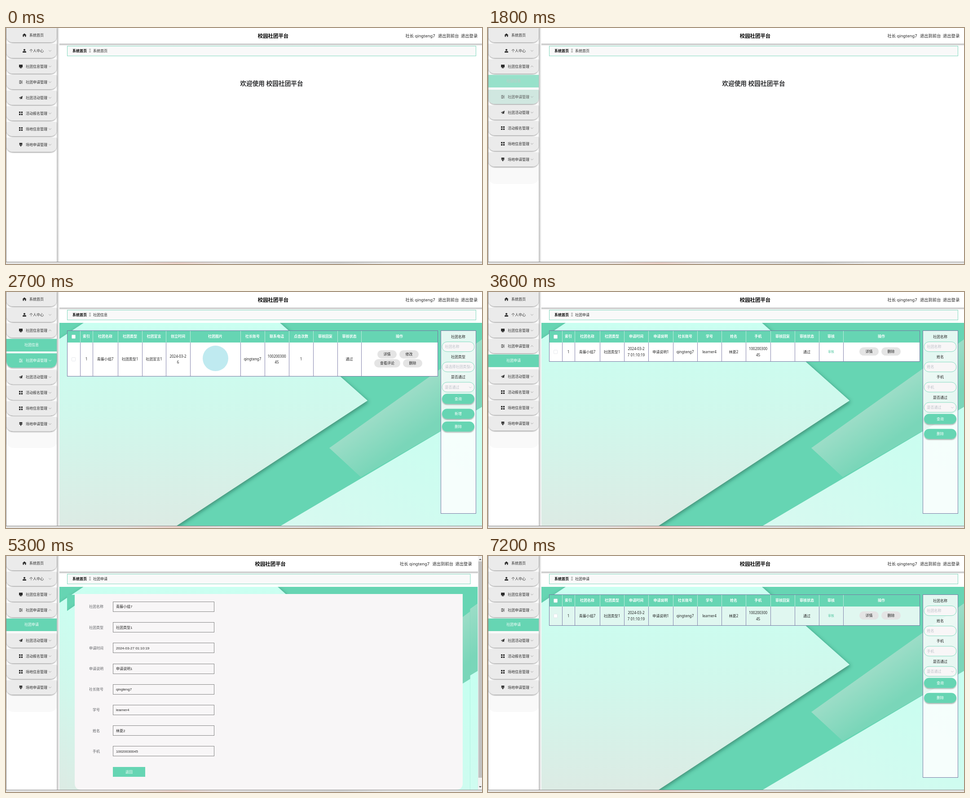
An HTML page for the animation above (8000 ms loop, 1060x528 px).

```html
<!DOCTYPE html>
<html lang="zh">
<head>
<meta charset="utf-8">
<title>校园社团平台</title>
<style>
  html, body { margin: 0; width: 100%; height: 100%; overflow: hidden; background: #fff; }
  svg { display: block; width: 1060px; height: 528px; }
  text { font-family: "Noto Sans", "Noto Sans CJK SC", sans-serif; white-space: pre; }
  .form text { font-family: "Liberation Sans", "Noto Sans CJK SC", sans-serif; }
</style>
</head>
<body>
<svg viewBox="0 0 1060 528">
  <defs>
    <filter id="soft" x="-20%" y="-20%" width="140%" height="160%">
      <feDropShadow dx="0" dy="2" stdDeviation="1.3" flood-color="#000" flood-opacity=".32"/>
    </filter>
    <filter id="deep" x="-10%" y="-10%" width="120%" height="120%">
      <feDropShadow dx="2" dy="3" stdDeviation="4" flood-color="#0a4434" flood-opacity=".5"/>
    </filter>
    <linearGradient id="sheet" x2="0" y2="1">
      <stop stop-color="#cafff1"/><stop offset=".45" stop-color="#d0f8ec"/><stop offset="1" stop-color="#dcebe4"/>
    </linearGradient>
    <linearGradient id="corner" x1="1" x2="0" y2="1">
      <stop stop-color="#c6fff0"/><stop offset="1" stop-color="#d8f9f0"/>
    </linearGradient>
    <linearGradient id="band" gradientUnits="userSpaceOnUse" x1="601" y1="280" x2="655" y2="355">
      <stop stop-color="#9cddc7"/><stop offset="1" stop-color="#7ad6b9"/>
    </linearGradient>
    <linearGradient id="side"><stop stop-color="#bbb"/><stop offset="1" stop-color="#fff"/></linearGradient>
    <linearGradient id="under" x2="0" y2="1"><stop stop-color="#b4b4b4"/><stop offset="1" stop-color="#b4b4b4" stop-opacity="0"/></linearGradient>
    <linearGradient id="strip">
      <stop stop-color="#e4e4e4"/><stop offset=".24" stop-color="#e6e2e0"/><stop offset=".36" stop-color="#ebd2ca"/>
      <stop offset=".46" stop-color="#e4e2e2"/><stop offset=".7" stop-color="#d6d6d6"/><stop offset=".8" stop-color="#e6e6e6"/>
    </linearGradient>
    <clipPath id="art"><rect width="941" height="454"/></clipPath>
    <g id="wall" clip-path="url(#art)">
      <rect width="941" height="454" fill="#66d5b3"/>
      <path d="M601 280L941 37V188L671 345Z" fill="url(#band)"/>
      <path d="M493 454L941 188V454Z" fill="url(#corner)"/>
      <path d="M54 0H491L686 174 261 454H0V36Z" fill="url(#sheet)" filter="url(#deep)"/>
    </g>
  </defs>
  <g id="stage"></g>
</svg>
<script>
const LOOP = 8000, GREEN = '#66d5b3', LINE = '#7777a3';
const USER = 'qingteng7', CLUB = '青藤小组7', LEARNER = 'learner4', PERSON = '林夏2', PHONE = '10020030045';

const rect = (x, y, w, h, fill, extra = '') =>
  `<rect x="${x}" y="${y}" width="${w}" height="${h}" fill="${fill}" ${extra}/>`;
const label = (s, x, y, { size = 8, fill = '#222', anchor = 'middle', bold = false } = {}) =>
  `<text x="${x}" y="${y + size * .37}" font-size="${size}" fill="${fill}" text-anchor="${anchor}"${bold ? ' font-weight="700"' : ''}>${s}</text>`;
const path = (d, stroke, width = 1) => `<path d="${d}" fill="none" stroke="${stroke}" stroke-width="${width}"/>`;
const chevron = (x, y, dir = 1, color = '#888') =>
  path(`M${x - 2.8} ${y - 1.4 * dir}L${x} ${y + 1.4 * dir} ${x + 2.8} ${y - 1.4 * dir}`, color, .7);
const pill = (s, x, y, w, h, fill, color, extra = '') =>
  rect(x - w / 2, y - h / 2, w, h, fill, `rx="${h / 2}" ${extra}`) + label(s, x, y, { fill: color });

function mix(a, b, k) {
  const part = (c, i) => parseInt(c.slice(i, i + 2), 16);
  return `rgb(${[1, 3, 5].map(i => Math.round(part(a, i) + (part(b, i) - part(a, i)) * k))})`;
}

// Linear interpolation through time, value pairs.
function track(points, t) {
  let i = 0;
  while (i < points.length && points[i][0] <= t) i++;
  if (!i) return points[0][1];
  if (i === points.length) return points[i - 1][1];
  const [t0, a] = points[i - 1], [t1, b] = points[i];
  return a + (b - a) * (t - t0) / (t1 - t0);
}

const ICONS = {
  home: '<path d="M-4.5 0L0-4 4.5 0H3.5V3.8H1.2V1H-1.2V3.8H-3.5V0Z"/>',
  user: '<circle cy="-2" r="2.1"/><path d="M-4 4V2.5Q-4 .7-2 .7H2Q4 .7 4 2.5V4Z"/>',
  screen: '<path d="M-4-4H4V2H1V3H2.5V4H-2.5V3H-1V2H-4Z"/>',
  sliders: '<path d="M-4-3.3H4V-2.5H-4ZM-4-.4H4V.4H-4ZM-4 2.5H4V3.3H-4ZM-2-4H-.8V-1.8H-2ZM1-1.1H2.2V1.1H1ZM-2 1.8H-.8V4H-2Z"/>',
  plane: '<path d="M4-4L2.6 3.2 0 2-1.6 4V1.4L2.5-2.5-2.4 1-4.3 0Z"/>',
  grid: '<path d="M-4-4H-.7V-.7H-4ZM.7-4H4V-.7H.7ZM-4 .7H-.7V4H-4ZM.7 .7H4V4H.7Z"/>',
  brush: '<path d="M-3.3-4H3.3V-.8H-3.3ZM-3.3-.2H3.3V1.4H1V4H-1V1.4H-3.3Z"/>'
};

const MENU = [
  { text: '系统首页', icon: 'home' },
  { text: '个人中心', icon: 'user', height: 61,
    hover: [[200, 0], [500, 1], [700, 1], [800, .8], [900, .35], [1000, 0]],
    open: [[500, 0], [600, .2], [700, .8], [800, 1], [1400, 1], [1500, .8], [1600, .2], [1700, 0]],
    subs: [['修改密码', [[700, 0], [900, .58], [1000, 1], [1100, .4], [1200, 0]]],
           ['个人信息', [[1000, 0], [1100, .6], [1200, .6], [1300, 0]]]] },
  { text: '社团信息管理', icon: 'screen', height: 33,
    hover: [[1100, 0], [1300, 1], [1500, 1], [1700, 0]],
    open: [[1400, 0], [1500, .2], [1600, .8], [1700, 1], [2600, 1], [2700, .98], [2800, .6], [2900, .15], [3000, 0]],
    subs: [['社团信息', [[1600, 0], [1800, .67], [1900, 1]]]] },
  { text: '社团申请管理', icon: 'sliders', height: 33,
    hover: [[1500, 0], [1700, .6], [1800, .2], [1900, 0], [2000, 0], [2300, 1], [2900, 1], [3200, 0]],
    open: [[2600, 0], [2700, .06], [2800, .45], [2900, .88], [3000, 1]],
    subs: [['社团申请', [[2900, 0], [3200, 1]]]] },
  { text: '社团活动管理', icon: 'plane', hover: [[3700, 0], [4000, 1], [4400, 1], [4600, 0]] },
  { text: '活动报名管理', icon: 'grid' },
  { text: '场地信息管理', icon: 'grid' },
  { text: '场地申请管理', icon: 'brush' }
];

function sidebar(t) {
  let out = rect(0, 0, 113, 523, '#fff') + rect(113, 0, 6, 523, 'url(#side)');
  if (t >= 1700) out += '<path d="M1 311H113V340Q106 349 96 349H18Q8 349 1 340Z" fill="#f9f9f9"/>';
  let y = 16;
  MENU.forEach((item, i) => {
    const hover = item.hover ? track(item.hover, t) : 0;
    const open = item.open ? track(item.open, t) : 0;
    const ink = mix('#2b2b2b', '#ffffff', hover), short = i < 2;
    out += `<path d="M1 ${y - 16}H113V${y}Q113 ${y + 16} 97 ${y + 16}H17Q1 ${y + 16} 1 ${y}Z" fill="${mix('#ebebeb', GREEN, hover)}" filter="url(#soft)"/>`;
    out += `<g transform="translate(${short ? 41 : 33} ${y})" fill="${ink}">${ICONS[item.icon]}</g>`;
    out += label(item.text, 68, y, { fill: ink });
    if (i) out += chevron(98, y, 1 - 2 * open, mix('#888888', '#ffffff', hover));
    if (open > 0) {
      const h = item.height * open, top = y + 18.5;
      out += `<svg x="1" y="${top}" width="112" height="${h}" overflow="hidden" style="width:112px;height:${h}px">${rect(0, 0, 112, item.height + 2, '#f9f9f9')}`;
      item.subs.forEach(([text, glow], n) => {
        const k = track(glow, t), sy = n * 30.5;
        out += rect(0, sy, 112, 28.5, mix('#f9f9f9', GREEN, k)) + label(text, 56, sy + 14, { fill: mix('#555555', '#ffffff', k) });
      });
      out += '</svg>';
      y += h;
    }
    y += 35;
  });
  return out;
}

function header(crumb, shift) {
  const top = { size: 9.3, anchor: 'start' };
  return rect(119, 35, 941 - shift * .7, 5, 'url(#under)') + rect(119, 0, 941, 35, '#fff') +
    label('校园社团平台', 595 - shift / 2, 18, { size: 11.4, bold: true, fill: '#000' }) +
    label('社长 ' + USER, 889.5 - shift, 18, top) +
    label('退出到前台', 962 - shift, 18, top) + label('退出登录', 1013 - shift, 18, top) +
    rect(136.5, 40.5, 910 - shift, 22, '#f9f9f9', 'stroke="#82d9bf"') +
    label('系统首页', 148, 51.5, { anchor: 'start', bold: true, fill: '#000' }) +
    label('Ξ', 187, 51.5) + label(crumb, 194, 51.5, { anchor: 'start' });
}

const wall = (x, y, scale) => `<use href="#wall" transform="translate(${x} ${y}) scale(${scale} 1)"/>`;
const box = (x, y) => rect(x - 4, y - 4, 8, 8, '#fff', 'rx="1" stroke="#dcdfe6" stroke-width=".7"');

function table({ edges, heads, cells, bottom, buttons }, { empty, hover }) {
  const end = empty ? 155 : bottom, mid = (113 + end) / 2;
  const center = i => (edges[i] + edges[i + 1]) / 2;
  let out = rect(136, 86, 825, 27, GREEN) + rect(136, 113, 825, end - 113, hover ? '#e0f7f0' : '#fff');
  out += box(150.5, 100);
  heads.forEach((s, i) => out += label(s, center(i + 1), 99.5, { fill: '#fff', bold: true }));
  edges.slice(1, -1).forEach(x => {
    out += path(`M${x + .5} 86V113`, '#d5f2e8', .8);
    if (!empty) out += path(`M${x + .5} 113V${end}`, LINE, .9);
  });
  if (empty) out += label('暂无数据', 548.5, mid, { fill: '#909399' });
  else {
    out += box(150.5, mid);
    cells.forEach((cell, i) => {
      const lines = cell.split('|');
      lines.forEach((s, n) => out += label(s, center(i + 1), mid + (n - (lines.length - 1) / 2) * 13.3,
        s === '审核' ? { size: 6.7, fill: '#4cc59d' } : {}));
    });
    buttons.forEach(([s, x, y, w = 43]) => out += pill(s, x, y, w, 18.5, '#e4e4e4', '#222'));
  }
  return out + rect(136.5, 86.5, 825, end - 86, 'none', `stroke="${LINE}"`);
}

function panel(fields, buttons) {
  let out = rect(968.5, 86.5, 78, 409, '#fff', `fill-opacity=".82" stroke="${LINE}"`);
  fields.forEach(([name, hint, select], i) => {
    const y = 100 + i * 45.2;
    out += label(name, 1007, y) + rect(971, y + 11.5, 72, 22, '#f8f6f7', 'rx="11" stroke="#66d5b3" stroke-width=".8"') +
      label(hint, 977.5, y + 22.3, { fill: '#bcc0c8', anchor: 'start' });
    if (select) out += chevron(1034, y + 23, 1, '#b5b9c0');
  });
  buttons.forEach(([s, y]) => out += pill(s, 1007, y, 72, 22.5, GREEN, '#fff', 'filter="url(#soft)"'));
  return out;
}

const CLUBS = {
  edges: [136, 165, 193, 249, 303, 356, 410, 522, 576, 630, 684, 738, 791, 961], bottom: 188,
  heads: ['索引', '社团名称', '社团类型', '社团宣言', '创立时间', '社团图片', '社长账号', '联系电话', '点击次数', '审核回复', '审核状态', '操作'],
  cells: ['1', CLUB, '社团类型1', '社团宣言1', '2024-03-2|6', '', USER, PHONE.slice(0, 9) + '|' + PHONE.slice(9), '1', '', '通过'],
  buttons: [['详情', 848.5, 139.5], ['修改', 897.5, 139.5], ['查看评论', 849, 159.5, 58], ['删除', 905.5, 159.5]]
};
const REQUESTS = {
  edges: [136, 165, 193, 249, 303, 357, 412, 466, 520, 574, 629, 683, 737, 791, 961], bottom: 155,
  heads: ['索引', '社团名称', '社团类型', '申请时间', '申请说明', '社长账号', '学号', '姓名', '手机', '审核回复', '审核状态', '审核', '操作'],
  cells: ['1', CLUB, '社团类型1', '2024-03-2|7 01:10:19', '申请说明1', USER, LEARNER, PERSON, PHONE.slice(0, 9) + '|' + PHONE.slice(9), '', '通过', '审核'],
  buttons: [['详情', 848.5, 133], ['删除', 897.5, 133]]
};
const FORM = [['社团名称', CLUB], ['社团类型', '社团类型1'], ['申请时间', '2024-03-27 01:10:19'], ['申请说明', '申请说明1'],
  ['社长账号', USER], ['学号', LEARNER], ['姓名', PERSON], ['手机', PHONE]];

const homePage = () => header('系统首页', 0) +
  label('欢迎使用 校园社团平台', 591.5, 123.5, { size: 13.7, bold: true, fill: '#303133' });

function clubsPage(t) {
  const empty = t < 2100;
  return header('社团信息', 0) + (t >= 2700 ? wall(119, 69, 1) : '') + table(CLUBS, { empty }) +
    (empty ? '' : '<circle cx="466.5" cy="148.5" r="28.5" fill="#bfeaf0"/>') +
    panel([['社团名称', '社团名称'], ['社团类型', '请选择社团类型', true], ['是否通过', '是否通过', true]],
      [['查询', 239], ['新增', 272.5], ['删除', 301]]);
}

const requestsPage = t => header('社团申请', 0) + wall(119, 69, 1) +
  table(REQUESTS, { hover: t >= 7200 || t >= 4800 && t < 5300 }) +
  panel([['社团名称', '社团名称'], ['姓名', '姓名'], ['手机', '手机'], ['是否通过', '是否通过', true]],
    [['查询', 284], ['删除', 317.5]]);

function formPage() {
  let out = header('社团申请', 12.5) + wall(119, 69, .99) + wall(136, 87, .954) +
    '<path d="M153 85H1017V508Q1017 523 1002 523H168Q153 523 153 508Z" fill="#f8f6f7"/><g class="form">';
  FORM.forEach(([name, value], i) => {
    const y = 113.5 + i * 46.2;
    out += label(name, 201, y, { fill: '#606266' }) +
      rect(238.5, Math.floor(y - 11) + .5, 225, 22, '#f8f6f7', 'stroke="#868686"') +
      label(value, 245, y, { anchor: 'start' });
  });
  return out + rect(238, 472, 72, 22, GREEN) + label('返回', 274, 483, { fill: '#fff' }) + '</g>' +
    rect(1051, 0, 9, 523, '#f1f1f1') + rect(1052, 12, 8, 484, '#c1c1c1') +
    '<path d="M1053 9L1056 6 1059 9ZM1053 515H1059L1056 518Z" fill="#505050"/>';
}

function page(t) {
  if (t < 2000) return homePage();
  if (t < 3600) return clubsPage(t);
  return t >= 5300 && t < 6900 ? formPage() : requestsPage(t);
}

const frameEdge = rect(0, 524, 1060, 4, 'url(#strip)') + rect(0, 523, 1060, 1, '#858585') + rect(0, 0, 1, 523, '#8a8a8a');
const stage = document.getElementById('stage');
const start = performance.now();
let shown = -1;

function tick() {
  const t = Math.floor((performance.now() - start) % LOOP / 100) * 100;
  if (t !== shown) {
    shown = t;
    stage.innerHTML = rect(0, 0, 1060, 528, '#fff') + page(t) + sidebar(t) + frameEdge;
  }
  requestAnimationFrame(tick);
}
tick();
</script>
</body>
</html>
```
